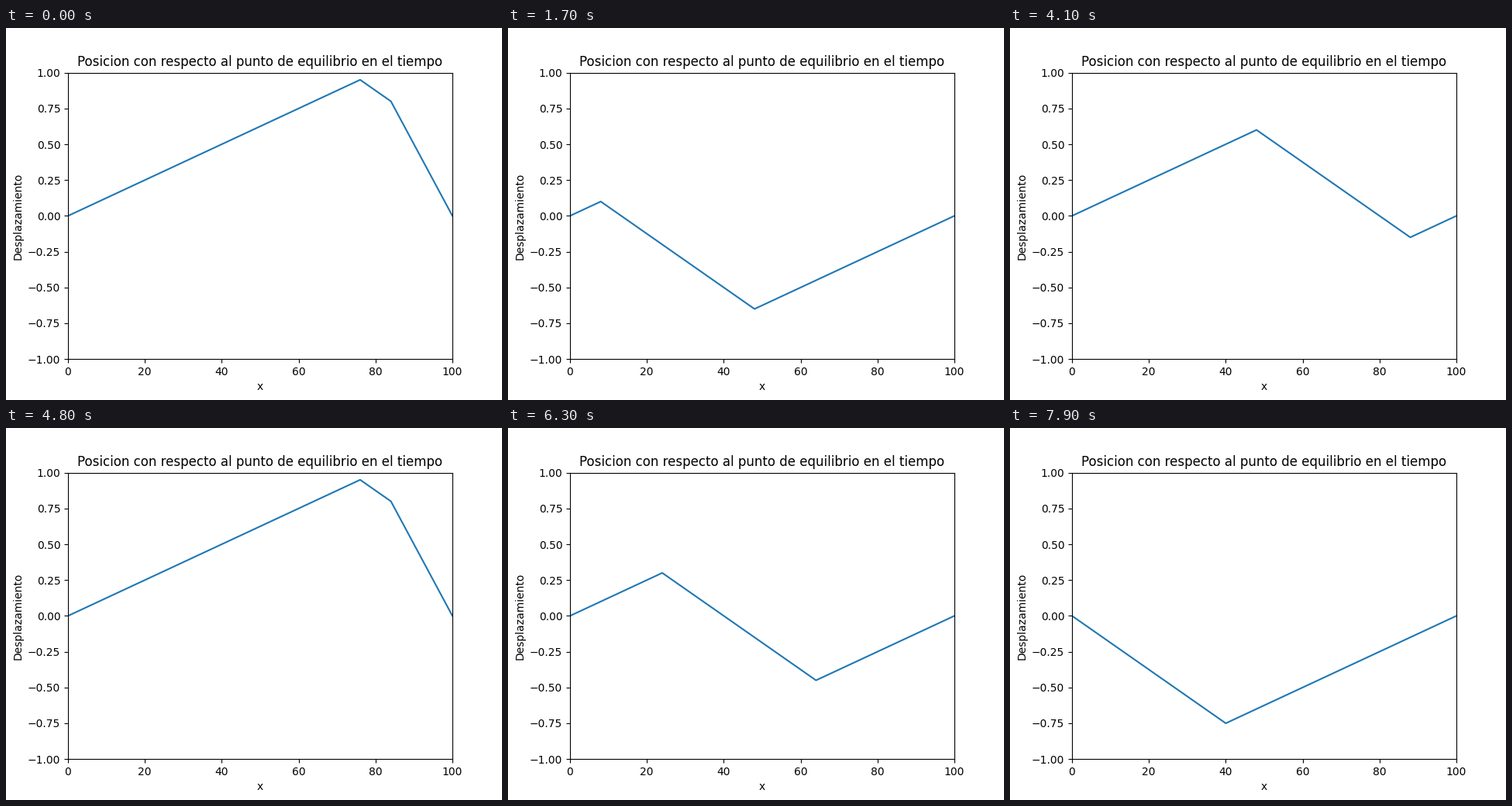
A matplotlib script for the animation above (8 s loop, 640 by 480 pixels).

```python
import numpy as np
import matplotlib.pyplot as plt
from matplotlib.animation import FuncAnimation

LENGTH = 100   # string length
PLUCK = 80     # where the string is pulled, to height 1
STEP = 4       # distance the waves travel per frame
FRAMES = 80

x = np.arange(LENGTH + 1)


def pluck(u):
    """Initial triangle, extended as an odd function of period 2 * LENGTH."""
    u = (u + LENGTH) % (2 * LENGTH) - LENGTH
    a = np.abs(u)
    return np.sign(u) * np.minimum(a / PLUCK, (LENGTH - a) / (LENGTH - PLUCK))


def string(frame):
    """Two opposite travelling waves (d'Alembert)."""
    s = STEP * (frame + 1)
    return (pluck(x - s) + pluck(x + s)) / 2


fig, ax = plt.subplots(figsize=(6.4, 4.8), dpi=100)
ax.set(xlim=(0, LENGTH), ylim=(-1, 1), xlabel="x", ylabel="Desplazamiento",
       title="Posicion con respecto al punto de equilibrio en el tiempo")
line, = ax.plot(x, string(0))


def update(frame):
    line.set_ydata(string(frame))
    return line,


anim = FuncAnimation(fig, update, frames=FRAMES, interval=100,
                     repeat=True, repeat_delay=0, blit=False)
plt.show()
```
